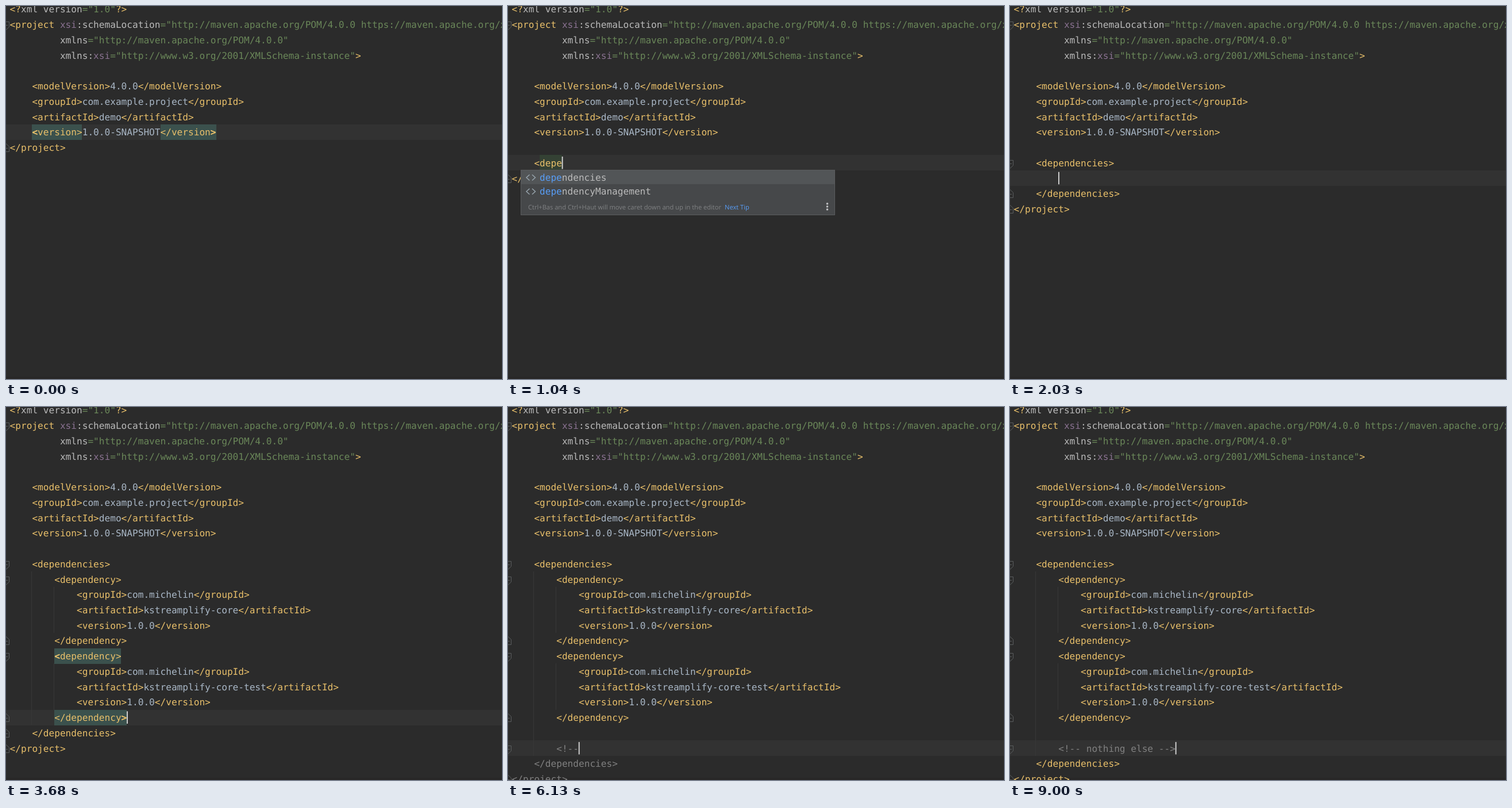
Recreate the animation shown at these times as an HTML page with a canvas. Size 863 px wide and 649 px high, loop 9.26 s.

```html
<!DOCTYPE html>
<html lang="en">
<head>
<meta charset="utf-8">
<title>Editing a Maven project file</title>
<style>
  html, body { margin: 0; width: 100%; height: 100%; overflow: hidden; background: #2b2b2b; }
  canvas { display: block; }
</style>
</head>
<body>
<canvas id="stage" width="863" height="649"></canvas>
<script>
const ctx = document.getElementById('stage').getContext('2d');
ctx.textRendering = 'geometricPrecision';
const LOOP = 9260, LEFT = 6.6, CHAR = 9.7, LINE = 26.74;
const CODE = '16.11px "DejaVu Sans Mono", monospace';
const HINT = '11.12px "Open Sans", sans-serif';
const TAG = '#e8bf6a', ATTR = '#bababa', NS = '#8a7291', VALUE = '#6a8759',
      TEXT = '#a9b7c6', COMMENT = '#808080', LINK = '#589df6', MATCH = '#3b514d';

const colX = col => LEFT + col * CHAR;
const lineY = line => line * LINE - 7.6;
const rowTop = line => Math.floor(lineY(line));
const baseline = line => Math.round(lineY(line)) + 19;

// Lines made of coloured runs
const header = [
  [[TAG, '<?'], [ATTR, 'xml version'], [VALUE, '="1.0"'], [TAG, '?>']],
  [[TAG, '<project '], [NS, 'xsi'], [ATTR, ':schemaLocation'],
   [VALUE, '="http://maven.apache.org/POM/4.0.0 https://maven.apache.org/xsd/maven-4.0.0.xsd"']],
  [[ATTR, '         xmlns'], [VALUE, '="http://maven.apache.org/POM/4.0.0"']],
  [[ATTR, '         xmlns:'], [NS, 'xsi'], [VALUE, '="http://www.w3.org/2001/XMLSchema-instance"'], [TAG, '>']]
];
const project = [
  '',
  '    <modelVersion>4.0.0</modelVersion>',
  '    <groupId>com.example.project</groupId>',
  '    <artifactId>demo</artifactId>',
  '    <version>1.0.0-SNAPSHOT</version>'
];
const dependency = artifact => [
  '        <dependency>',
  '            <groupId>com.michelin</groupId>',
  `            <artifactId>${artifact}</artifactId>`,
  '            <version>1.0.0</version>',
  '        </dependency>'
];
const OPEN = '    <dependencies>', CLOSE = '    </dependencies>', END = '</project>';
const pasted = [OPEN, ...dependency('kstreamplify-core'), ...dependency('kstreamplify-core-test')];

const suggestions = ['dependencies', 'version', 'artifactId', 'build', 'ciManagement', 'contributors',
  'dependencyManagement', 'description', 'developers', 'distributionManagement', 'groupId', 'inceptionYear'];
const arrowTip = ['Ctrl+Bas and Ctrl+Haut will move caret down and up in the editor', 342];
const dotTip = ['Press Ctrl+. to choose the selected (or first) suggestion and insert a dot afterwards', 423];

const steps = [];
const at = (time, change) => steps.push([time, change]);
const caretAt = (line, col) => ({ line, col, caret: true });

at(0, { body: [END], line: 8, col: 4, caret: false, bold: true, match: [[8, 4, 13], [8, 27, 37]] });
at(70, { body: ['', END], bold: false, ...caretAt(9, 4) });
at(340, { body: ['', '', END], match: [], ...caretAt(10, 4) });
[430, 630, 770, 910, 1040, 1170].forEach((time, n) => {
  const prefix = 'depen'.slice(0, n);
  at(time, {
    body: ['', '    <' + prefix, END], typed: n, ...caretAt(10, 5 + n),
    popup: { items: suggestions.filter(s => s.startsWith(prefix)), prefix, tip: arrowTip, col: 5 }
  });
});
at(1510, { body: ['', OPEN + CLOSE.trim(), END], popup: null, typed: 0, ...caretAt(10, 18) });
at(1700, { body: ['', OPEN, '', CLOSE, END] });
at(2030, caretAt(11, 8));
at(2490, { body: ['', ...pasted, CLOSE, END], ...caretAt(20, 21) });
at(2620, { guides: true });
at(2890, { match: [[16, 8, 20], [20, 8, 21]], bold: true });
at(3160, { caret: false });
at(3680, { caret: true });
at(4140, { body: ['', ...pasted, '', CLOSE, END], bold: false, ...caretAt(21, 8) });
at(4540, { body: ['', ...pasted, '', '', CLOSE, END], match: [], ...caretAt(22, 8) });
const note = '<!-- nothing else -->';
[4800, 5260, 5600, 5730, 6190, 6390,
 6720, 6880, 7040, 7190, 7350, 7510, 7670,
 7800, 7940, 8070, 8200, 8340, 8670, 8840, 9000].forEach((time, n) =>
  at(time, {
    body: ['', ...pasted, '', '        ' + note.slice(0, n + 1), CLOSE, END],
    popup: null, ...caretAt(22, 9 + n)
  }));
at(4930, { popup: { items: ['dependency'], prefix: '', tip: dotTip, col: 9 } });
at(5860, { open: true, noteFold: true });
at(9000, { open: false });
steps.sort((a, b) => a[0] - b[0]);

function box(color, x, y, w, h) {
  ctx.fillStyle = color;
  ctx.fillRect(x, y, w, h);
}

function write(text, x, y, color, font = CODE) {
  ctx.font = font;
  ctx.fillStyle = color;
  ctx.fillText(text, x, y);
}

function stroke(color, width, ...paths) {
  ctx.strokeStyle = color;
  ctx.lineWidth = width;
  ctx.beginPath();
  for (const path of paths) path.forEach(([x, y], i) => i ? ctx.lineTo(x, y) : ctx.moveTo(x, y));
  ctx.stroke();
}

function colorRuns(text, line, s) {
  if (line === 22 && text.includes('<!') || s.open && line > 22) return [[COMMENT, text]];
  return text.split(/(<[^>]*>?)/).map(part => [part[0] === '<' ? TAG : TEXT, part]);
}

function writeLine(runs, line) {
  let col = 0;
  for (const [color, text] of runs) {
    write(text, colX(col), baseline(line), color);
    col += text.length;
  }
}

function fold(line, direction) {
  const y = Math.round(lineY(line)) + (direction > 0 ? 15.5 : 13.5);
  const py = d => y + d * direction;
  stroke('#5a5d5e', 1,
    [[0, py(-7)], [5.5, py(-7)], [5.5, py(2)], [0, py(7)]],
    [[0, py(-1)], [3, py(-1)]]);
}

function drawFolds(lines, s) {
  fold(1, 1);
  lines.forEach((text, i) => {
    const line = i + 4, tag = text.trim();
    if (/^<dependenc(y|ies)>$/.test(tag)) fold(line, 1);
    if (/^<\/(dependenc(y|ies)|project)>$/.test(tag) && !(s.noteFold && line === 23)) fold(line, -1);
  });
  if (s.noteFold) fold(22, 1);
}

function drawGuides(closingLine) {
  const guide = (x, from, to) => box('#383838', x, rowTop(from), 1, rowTop(to) - rowTop(from));
  guide(44, 11, closingLine);
  guide(83, 12, 15);
  guide(83, 17, 20);
}

function drawPopup({ items, prefix, tip, col }, line) {
  const x = Math.round(colX(col)) - 33, y = Math.floor(lineY(line) + 25.3), pitch = 24.25;
  const height = Math.round(Math.min(items.length, 11.53) * pitch + 30.5);
  const bottom = y + height, scrolls = items.length > 11;
  box('#46484a', x, y, 547, height);
  box('#525557', x + 1, y + 1, scrolls ? 534 : 545, 24);
  ctx.save();
  ctx.beginPath();
  ctx.rect(x, y, 547, height - 29);
  ctx.clip();
  items.forEach((item, i) => {
    const cy = y + 13.5 + i * pitch, base = Math.round(cy + 5.5);
    stroke('#9aa7b0', 1.4,
      [[x + 15.5, cy - 5], [x + 10, cy], [x + 15.5, cy + 5]],
      [[x + 20, cy - 5], [x + 25.5, cy], [x + 20, cy + 5]]);
    write(prefix, x + 33, base, LINK);
    write(item.slice(prefix.length), x + 33 + prefix.length * CHAR, base, '#bbbbbb');
  });
  ctx.restore();
  if (scrolls) box('#636567', x + 534, y + 2, 10, 101);
  write(tip[0], x + 13, bottom - 10, '#808284', HINT);
  write('Next Tip', x + 13 + tip[1], bottom - 10, LINK, HINT);
  for (const dy of [-20, -15, -10]) {
    ctx.fillStyle = '#c0c2c4';
    ctx.beginPath();
    ctx.arc(x + 533.5, bottom + dy, 1.8, 0, 7);
    ctx.fill();
  }
  ctx.strokeStyle = '#5a5c5e';
  ctx.lineWidth = 1;
  ctx.strokeRect(x + .5, y + .5, 546, height - 1);
}

function drawMatch(s) {
  s.match.forEach(([line, from, to]) =>
    box(MATCH, Math.round(colX(from)), rowTop(line), Math.round((to - from) * CHAR), 27));
}

function drawBold(s) {
  const [first, last] = s.match;
  write('<', colX(first[1]), baseline(first[0]), TAG, 'bold ' + CODE);
  write('>', colX(last[2] - 1), baseline(last[0]), TAG, 'bold ' + CODE);
}

function draw(t) {
  const s = Object.assign({}, ...steps.filter(([time]) => time <= t).map(([, change]) => change));
  const lines = [...project, ...s.body];
  box('#2b2b2b', 0, 0, 863, 649);
  box('#323232', 0, rowTop(s.line), 863, 27);
  box('#282727', 0, 645, 863, 4);
  if (s.guides) drawGuides(lines.indexOf(CLOSE) + 4);
  drawMatch(s);
  if (s.typed) box('#344134', colX(5), rowTop(10), s.typed * CHAR, 27);
  header.forEach(writeLine);
  lines.forEach((text, i) => writeLine(colorRuns(text, i + 4, s), i + 4));
  if (s.bold) drawBold(s);
  drawFolds(lines, s);
  if (s.caret) box('#dcdcdc', colX(s.col) - .2, lineY(s.line) + 2.2, 1.8, 21.6);
  if (s.popup) drawPopup(s.popup, s.line);
}

const start = performance.now();
function tick() {
  draw((performance.now() - start) % LOOP);
  requestAnimationFrame(tick);
}
tick();
</script>
</body>
</html>
```
